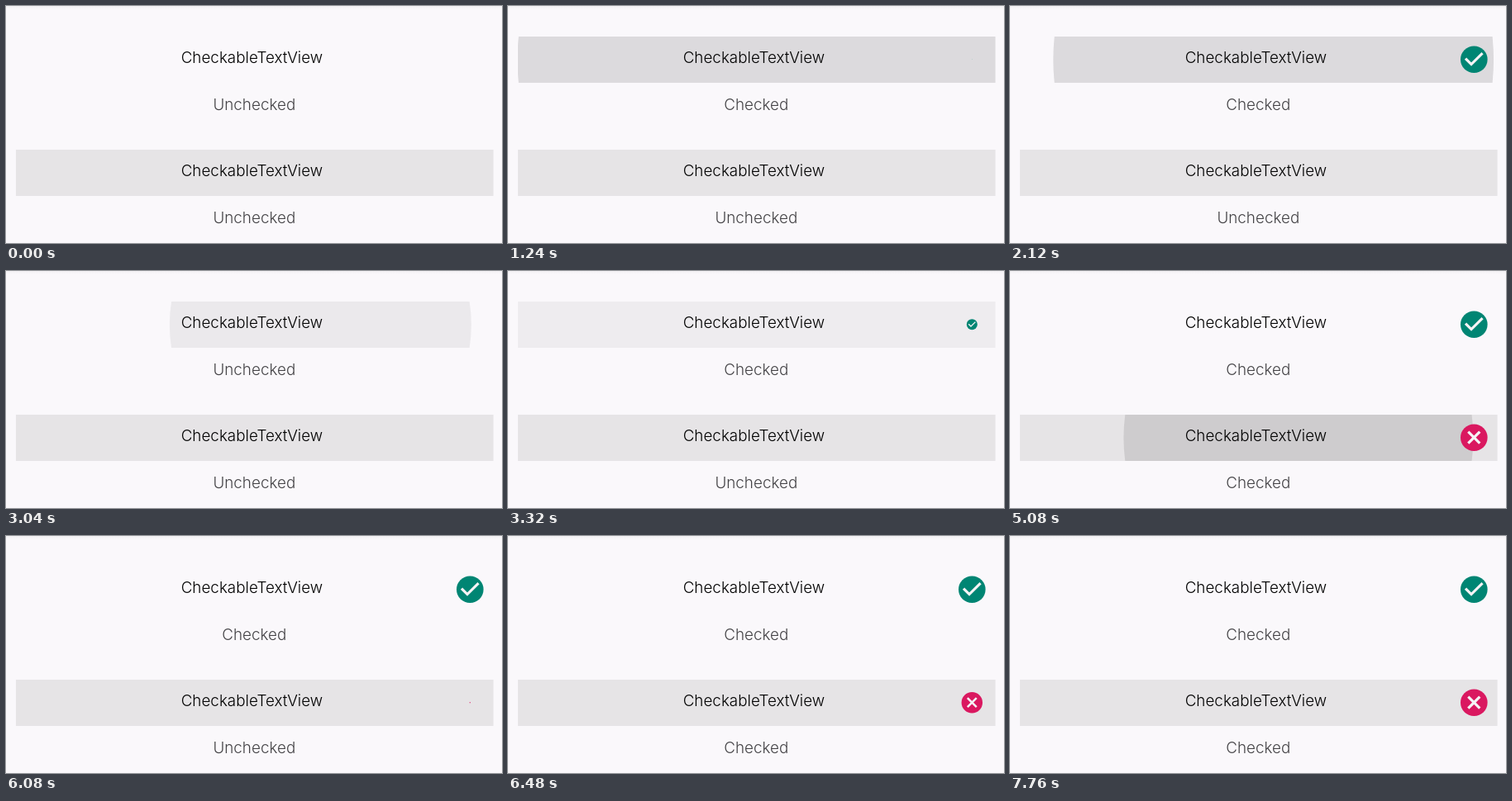
An HTML page with a canvas for the animation above (8040 ms loop, 600 by 287 pixels).

```html
<!DOCTYPE html>
<html lang="en">
<head>
<meta charset="utf-8">
<style>
  html, body { margin: 0; width: 100%; height: 100%; overflow: hidden; background: #faf8fb; }
  canvas { display: block; }
</style>
</head>
<body>
<canvas id="stage" width="600" height="287"></canvas>
<script>
const ctx = document.getElementById('stage').getContext('2d');
const LOOP = 8040, STEP = 40;
const BAR = { x: 12, w: 577.6, h: 56 };
const RIPPLE = { grow: 225, fadeIn: 75, fadeOut: 150, alpha: 0.122, from: 173.5, to: 290.4 };
const CLICK_DELAY = 185, ICON_TIME = 300;

// Each tap toggles its row; rest is the icon scale left after unchecking.
const rows = [
  { top: 37, fill: null, color: '#008573', touchX: 387, rest: 0, taps: [1035, 2004, 3004],
    mark: [[[-6.3, -0.7], [-2, 3.6], [6.3, -4.7]]] },
  { top: 174, fill: '#e6e4e6', color: '#da1860', touchX: 372, rest: 0.04, taps: [4054, 5016, 6090],
    mark: [[[-4.3, -4.3], [4.3, 4.3]], [[-4.3, 4.3], [4.3, -4.3]]] }
];

const clamp = v => Math.max(0, Math.min(1, v));
const mix = (a, b, k) => a + (b - a) * k;
const easeInOut = k => (1 - Math.cos(Math.PI * clamp(k))) / 2;

// cubic-bezier(0.4, 0, 0.2, 1)
function fastOutSlowIn(x) {
  let lo = 0, hi = 1;
  for (let i = 0; i < 20; i++) {
    const s = (lo + hi) / 2, r = 1 - s;
    if (1.2 * s * r * r + 0.6 * s * s * r + s * s * s < x) lo = s; else hi = s;
  }
  return lo * lo * (3 - 2 * lo);
}

function drawRipple(row, age) {
  const { grow, fadeIn, fadeOut, alpha, from, to } = RIPPLE;
  if (age < 0 || age > grow + fadeOut) return;
  const k = fastOutSlowIn(clamp(age / grow));
  const opacity = alpha * clamp(age / fadeIn) * clamp(1 - (age - grow) / fadeOut);
  ctx.save();
  ctx.beginPath();
  ctx.rect(BAR.x, row.top, BAR.w, BAR.h);
  ctx.clip();
  ctx.fillStyle = `rgba(0,0,0,${opacity})`;
  ctx.beginPath();
  ctx.arc(mix(row.touchX, 301, k), row.top + BAR.h / 2, mix(from, to, k), 0, 7);
  ctx.fill();
  ctx.restore();
}

function drawIcon(row, scale) {
  if (scale <= 0) return;
  ctx.save();
  ctx.translate(561.3, row.top + 27.7);
  ctx.scale(1.63 * scale, 1.63 * scale);
  ctx.fillStyle = row.color;
  ctx.beginPath();
  ctx.arc(0, 0, 10, 0, 7);
  ctx.fill();
  ctx.strokeStyle = '#f5f3f5';
  ctx.lineWidth = 2;
  ctx.beginPath();
  for (const line of row.mark) line.forEach(([x, y], i) => i ? ctx.lineTo(x, y) : ctx.moveTo(x, y));
  ctx.stroke();
  ctx.restore();
}

function drawText(text, x, y, color) {
  ctx.fillStyle = color;
  ctx.fillText(text, x, y);
}

function drawRow(row, time) {
  let checked = false, scale = 0;
  if (row.fill) {
    ctx.fillStyle = row.fill;
    ctx.fillRect(BAR.x, row.top, BAR.w, BAR.h);
  }
  for (const tap of row.taps) {
    drawRipple(row, time - tap);
    const age = time - tap - CLICK_DELAY;
    if (age < 0) continue;
    checked = !checked;
    scale = mix(scale, checked ? 1 : row.rest, easeInOut(age / ICON_TIME));
  }
  drawIcon(row, scale);
  drawText('CheckableTextView', 297.4, row.top + 32, '#000');
  drawText(checked ? 'Checked' : 'Unchecked', 300.3, row.top + 89, '#444346');
}

function draw(time) {
  ctx.fillStyle = '#faf8fb';
  ctx.fillRect(0, 0, 600, 287);
  const shade = ctx.createLinearGradient(0, 0, 0, 4);
  shade.addColorStop(0, '#f3f1f4');
  shade.addColorStop(1, '#faf8fb');
  ctx.fillStyle = shade;
  ctx.fillRect(0, 0, 600, 4);
  ctx.font = '300 18.85px Inter, sans-serif';
  ctx.textAlign = 'center';
  rows.forEach(row => drawRow(row, time));
}

const start = performance.now();
function tick() {
  const time = (performance.now() - start) % LOOP;
  draw(Math.floor(time / STEP) * STEP);
  requestAnimationFrame(tick);
}
tick();
</script>
</body>
</html>
```
